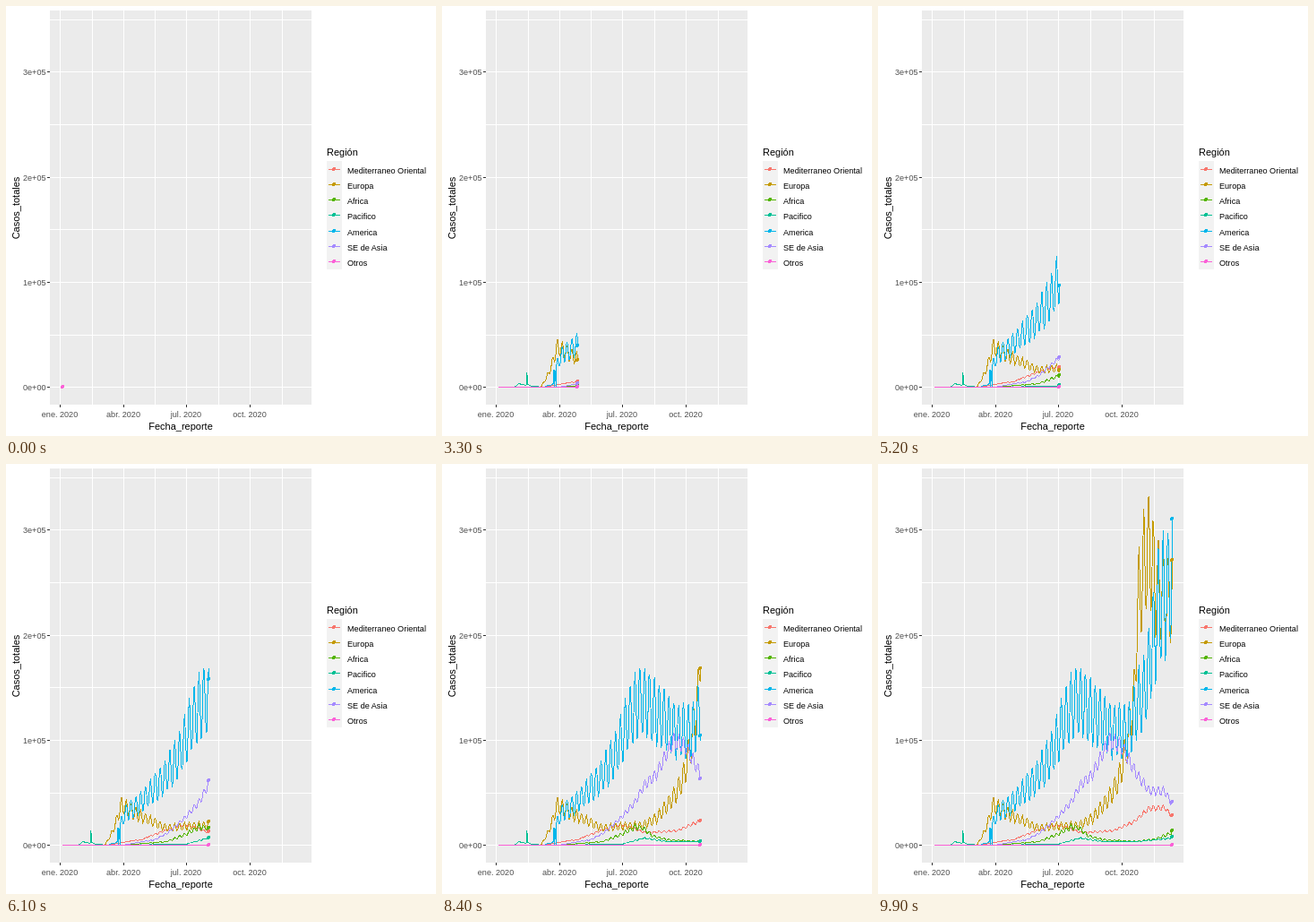
These frames come from a looping animation (480x480 px, 10 s). An HTML page:

```html
<!DOCTYPE html>
<html lang="es">
<head>
<meta charset="utf-8">
<style>
  html, body { margin: 0; width: 100%; height: 100%; overflow: hidden; background: #fff; }
  svg { display: block; width: 480px; height: 480px; font: 9.1px "Liberation Sans", Arial, sans-serif; }
  .title { font-size: 11px; }
  .tick { fill: #4d4d4d; }
  g { shape-rendering: crispEdges; }
  path { fill: none; }
</style>
</head>
<body>
<svg id="chart" viewBox="0 0 480 480"></svg>
<script>
const chart = document.getElementById('chart');
const BASE = 425, DAY = 0.7737, WEEK = 7 * DAY;
const START = 62.6, END = 329, PEAK = 220.3;

function add(parent, tag, attrs, text) {
  const el = document.createElementNS('http://www.w3.org/2000/svg', tag);
  for (const key in attrs) el.setAttribute(key, attrs[key]);
  if (text) el.textContent = text;
  parent.append(el);
  return el;
}

function valueAt(points, x) {
  const i = points.findIndex(p => p[0] >= x);
  if (i < 0) return points[points.length - 1][1];
  if (i === 0) return points[0][1];
  const [x0, y0] = points[i - 1], [x1, y1] = points[i];
  return y0 + (y1 - y0) * (x - x0) / (x1 - x0);
}

const noise = n => Math.abs(Math.sin(n * 12.9898) * 43758.5453) % 1;

// Daily samples of a trend (x, height) that swings over each week
function daily(swing, ...trend) {
  const points = [];
  for (let n = 0, x = START; x < END; x = START + DAY * ++n) {
    const wave = Math.cos(2 * Math.PI * (x - PEAK) / WEEK) * (0.85 + 0.3 * noise(n));
    points.push([x, BASE - valueAt(trend, x) * (1 + swing * wave)]);
  }
  return points;
}

const series = [
  ['Mediterraneo Oriental', '#F8766D', daily(0.07,
    [112, 0], [135, 4], [150, 6], [168, 13], [190, 21], [200, 23], [227, 14], [262, 16],
    [285, 26], [302, 41], [320, 42], [328, 31])],
  ['Europa', '#C49A00', daily(0.2,
    [110, 0], [119, 16], [128.5, 45], [150, 32], [179, 19], [200, 21], [224, 22], [240, 31],
    [256, 51], [268, 71], [276, 105], [286, 170], [289, 265], [301, 336], [312, 283], [328, 270])],
  ['Africa', '#53B400', daily(0.15,
    [130, 0], [179, 4], [200, 12], [215, 20], [224, 19], [235, 10], [251, 6], [289, 4],
    [310, 7], [328, 14])],
  ['Pacifico', '#00C094', daily(0.1,
    [80, 0], [86, 4], [93.5, 2], [94.3, 17], [95.1, 3], [100, 1], [115, 0], [200, 1],
    [225, 8], [251, 4], [289, 4], [328, 8])],
  ['America', '#00B6EB', daily(0.25,
    [112, 0], [123.7, 3], [124.5, 22], [125.3, 0], [126, 26], [126.8, 0], [127.6, 24],
    [133, 36], [150, 47], [179, 78], [193, 100], [209, 142], [222, 165], [237, 150],
    [264, 126], [280, 126], [289, 158], [296, 165], [312, 262], [328, 298])],
  ['SE de Asia', '#A58AFF', daily(0.08,
    [130, 0], [165, 6], [179, 13], [200, 31], [215, 48], [225, 67], [238, 78], [258, 117],
    [272, 109], [289, 78], [302, 61], [320, 60], [328, 45])],
  ['Otros', '#FB61D7', daily(0, [START, 0])]
];

function drawFrame() {
  const g = add(chart, 'g', {});
  add(g, 'rect', { x: 49, y: 5, width: 292, height: 440, fill: '#ebebeb' });
  const line = (d, stroke) => add(g, 'path', { d, stroke });
  const label = (x, y, text, anchor = 'start', cls = '') =>
    add(chart, 'text', { x, y, 'text-anchor': anchor, class: cls }, text);

  for (let i = 0; i < 8; i++) {
    // Half quarters last 45.5 days until July, then 46
    const x = Math.floor(60.8 + DAY * (45.5 * i + Math.max(0, i - 4) / 2)) + 0.5;
    const y = Math.floor(425.9 - 58.66 * i) + 0.5;
    line(`M${x} 5V445M49 ${y}H341`, '#fff');
    if (i % 2) continue;
    line(`M${x} 445v3M46 ${y}h3`, '#333');
    label(x - 0.5, 459, ['ene.', 'abr.', 'jul.', 'oct.'][i / 2] + ' 2020', 'middle', 'tick');
    label(44.5, y + 3.5, i / 2 + (i ? 'e+05' : 'e+00'), 'end', 'tick');
  }
  label(195, 473, 'Fecha_reporte', 'middle', 'title');
  label(0, 0, 'Casos_totales', 'middle', 'title').setAttribute('transform', 'translate(15 225.5) rotate(-90)');
  label(358, 167, 'Región', 'start', 'title');

  add(g, 'rect', { x: 358, y: 173, width: 17, height: 121, fill: '#f2f2f2' });
  series.forEach(([name, color], i) => {
    const y = Math.floor(182 + 17.28 * i);
    line(`M360 ${y + 0.5}h13`, color);
    add(g, 'circle', { cx: 366, cy: y, r: 2, fill: color });
    label(381, y + 4.5, name);
  });
}

drawFrame();
const layer = add(chart, 'g', {});
const lines = series.map(s => add(layer, 'path', { stroke: s[1], transform: 'translate(.5 .5)' }));
const dots = series.map(s => add(layer, 'circle', { r: 2, fill: s[1] }));

function draw(now) {
  const step = Math.floor(now / 100) % 100;
  const x = 63 + 2.68 * step;
  series.forEach(([, , points], i) => {
    const y = valueAt(points, x);
    const shown = points.filter(p => p[0] < x).concat([[x, y]]);
    lines[i].setAttribute('d', 'M' + shown.map(p => p.map(v => v.toFixed(1)).join(' ')).join('L'));
    dots[i].setAttribute('cx', Math.round(x));
    dots[i].setAttribute('cy', Math.round(y));
  });
}

const start = performance.now();
function tick() {
  draw(performance.now() - start);
  requestAnimationFrame(tick);
}
tick();
</script>
</body>
</html>
```
